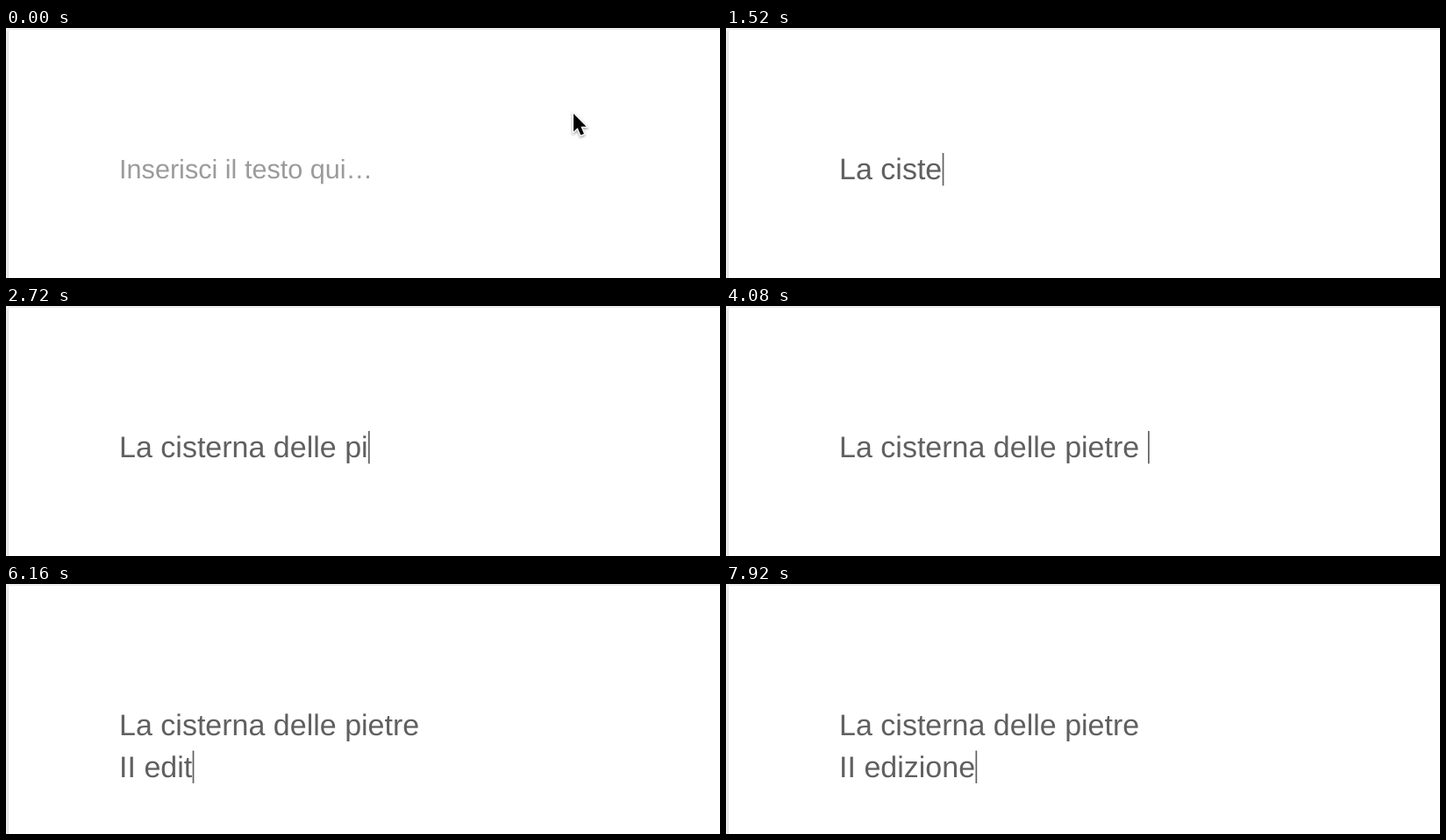
Recreate the animation shown at these times as an HTML page with a canvas. Size 814 by 286 pixels, loop 9.82 s.

```html
<!DOCTYPE html>
<html lang="it">
<head>
<meta charset="utf-8">
<style>
  html, body { margin: 0; width: 100%; height: 100%; overflow: hidden; background: #f1f1f1; }
  #page {
    position: absolute; inset: 2px 0 0 3px;
    background: #fff; border-radius: 2px 0 0 0; box-shadow: 0 1px 3px rgba(0, 0, 0, .22);
  }
  canvas { position: absolute; left: 0; top: 0; width: 100%; height: 100%; }
</style>
</head>
<body>
<div id="page"></div>
<canvas id="stage" width="814" height="286"></canvas>
<script>
const ctx = document.getElementById('stage').getContext('2d');
const LOOP = 9820, BLINK = 400, LAST_BLINK = 7920;
const FOCUS = 140, FIRST_KEY = 520;
const LEFT = 129.1, BASELINE = 173, LINE = 47.6;

// Typed strings paired with the times of their keys; '\b' deletes.
const bursts = [
  ['La cistern', [520, 640, 760, 920, 1040, 1200, 1360, 1520, 1600, 1700]],
  ['a delle p', [1780, 1880, 1960, 2040, 2180, 2260, 2340, 2440, 2560]],
  ['ietre ', [2720, 2860, 2960, 3060, 3160, 3280]],
  ['\nII', [4100, 4940, 5080]],
  [' edit\b', [5640, 5800, 5920, 6040, 6160, 6420]],
  ['zione', [6540, 6680, 6820, 6960, 7120]]
];
const keys = bursts.flatMap(([text, times]) => times.map((at, i) => ({ at, char: text[i] })));
// Events that restart the blinking without adding text.
keys.push({ at: FOCUS, char: '' }, { at: 4260, char: '' });
keys.sort((a, b) => a.at - b.at);

function setFont(size, color) {
  ctx.font = `${size}px "Liberation Sans", Arial, sans-serif`;
  ctx.textRendering = 'geometricPrecision';
  ctx.fillStyle = color;
}

function drawPointer(x, y) {
  const arrow = new Path2D('M0 0V20.5L4.7 16.2L8.2 24.6L11.9 23L8.4 14.8H14.6Z');
  ctx.save();
  ctx.translate(x, y);
  ctx.lineWidth = 2.6;
  ctx.strokeStyle = '#fff';
  ctx.shadowColor = 'rgba(0, 0, 0, .4)';
  ctx.shadowBlur = 3;
  ctx.shadowOffsetY = 1.5;
  ctx.stroke(arrow);
  ctx.shadowColor = 'transparent';
  ctx.fillStyle = '#000';
  ctx.fill(arrow);
  ctx.restore();
}

function drawTyping(t) {
  const pressed = keys.filter(key => key.at <= t);
  const text = pressed.reduce((s, { char }) => char === '\b' ? s.slice(0, -1) : s + char, '');
  const lines = text.split('\n');
  setFont(34, '#606060');
  lines.forEach((line, i) => ctx.fillText(line, LEFT, BASELINE + i * LINE));

  const idle = Math.min(t, LAST_BLINK) - pressed[pressed.length - 1].at;
  if (Math.floor(idle / BLINK) % 2 === 0) {
    const row = lines.length - 1;
    ctx.fillRect(LEFT + 0.4 + ctx.measureText(lines[row]).width, 143 + row * LINE, 1.7, 37.4);
  }
}

function draw(t) {
  ctx.clearRect(0, 0, 814, 286);
  if (t < FOCUS) {
    setFont(30.6, '#9b9b9b');
    ctx.fillText('Inserisci il testo qui…', LEFT, 172);
  } else {
    drawTyping(t);
  }
  if (t < FIRST_KEY) drawPointer(647, t < 40 ? 98 : 99);
}

function frame() {
  draw(performance.now() % LOOP);
  requestAnimationFrame(frame);
}
frame();
</script>
</body>
</html>
```
